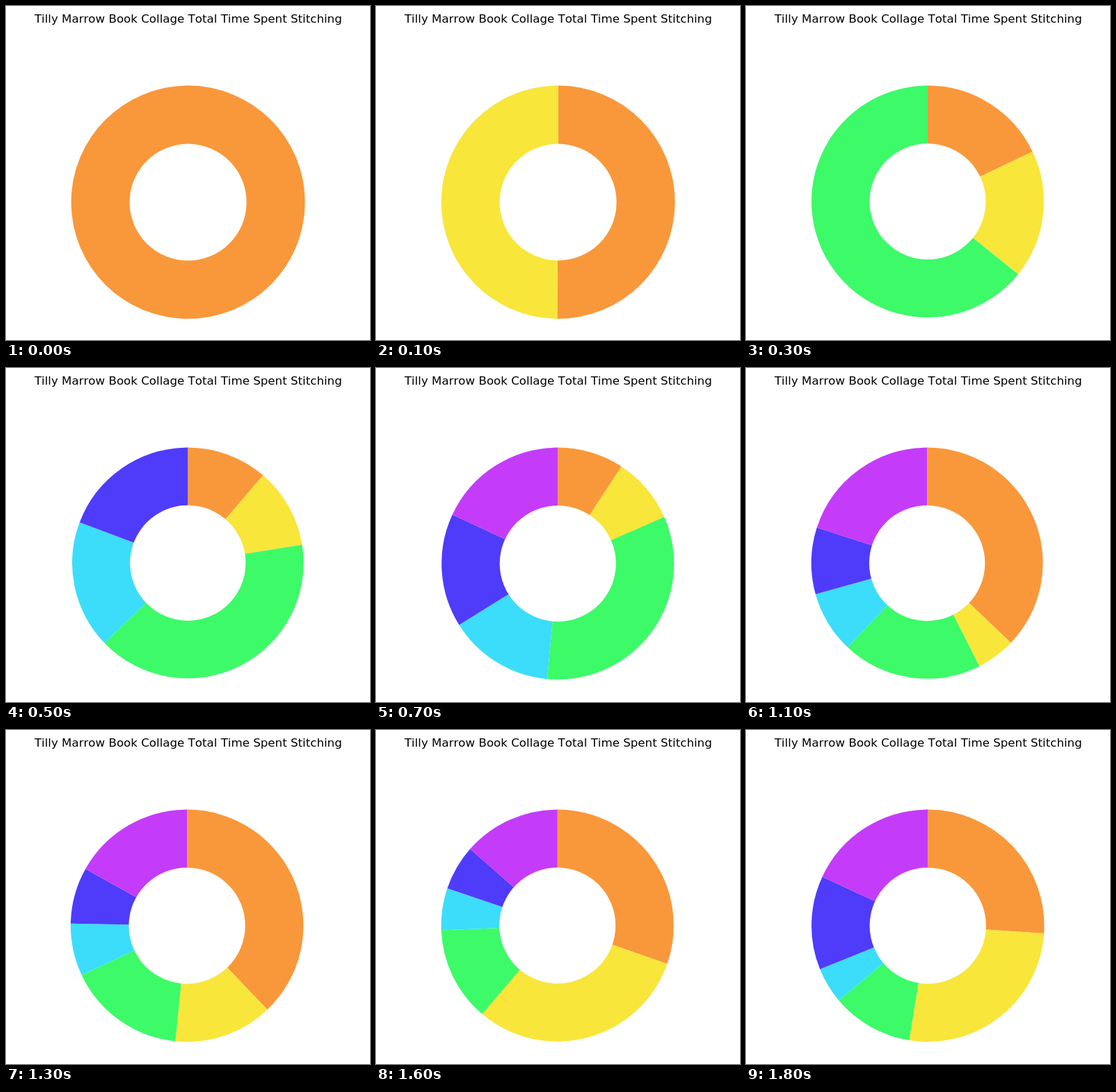
These frames come from a looping animation (523x481 px, 3.9 s). An HTML page:

```html
<!DOCTYPE html>
<html lang="en">
<head>
<meta charset="utf-8">
<title>Time Spent Stitching</title>
<style>
  html, body { margin: 0; width: 100%; height: 100%; overflow: hidden; background: #fff; }
  svg { display: block; }
  text { font: 16.667px "DejaVu Sans", sans-serif; font-kerning: none; text-anchor: middle; }
</style>
</head>
<body>
<svg width="523" height="481" viewBox="0 0 523 481">
  <text x="261.8" y="24">Tilly Marrow Book Collage Total Time Spent Stitching</text>
  <g id="wedges"></g>
  <circle id="hole" fill="#fff"/>
</svg>
<script>
const COLORS = ['#f9983a', '#f8e63b', '#3dfa69', '#3cddfa', '#4e3cfa', '#c43cfa'];
// One stitching session per step: [category, hours]
const SESSIONS = [
  [0, 1], [1, .995], [2, 1.79], [2, 1.79], [3, 1.59], [4, 1.71], [5, .98], [5, .98], [5, 1.72],
  [0, 2.94], [0, 1.44], [0, 1.44], [0, 1.44], [1, 2], [1, 1.8], [1, 1.8], [1, 1.8],
  [4, 2.42], [5, 2.05]
];
const STEP = 100, LOOP = 3900;
const MID_X = 261.6, TOP = 114.6, HEIGHT = 336;
const { sin, cos, tan, PI } = Math;

const wedges = document.getElementById('wedges');
const hole = document.getElementById('hole');
const paths = COLORS.map(color => {
  const path = document.createElementNS('http://www.w3.org/2000/svg', 'path');
  path.setAttribute('fill', color);
  return wedges.appendChild(path);
});

// Clockwise angles from the top, one [start, end] per category
function slices(step) {
  const hours = COLORS.map(() => 0);
  for (const [i, h] of SESSIONS.slice(0, step + 1)) hours[i] += h;
  const total = hours.reduce((a, b) => a + b);
  let end = 0;
  return hours.map(h => [end, end += h / total * 2 * PI]);
}

// The chart is scaled to the bounds of the Bezier handles of its arcs
function layout(arcs) {
  let left = -1, right = 1, bottom = 1;
  for (const [a, b] of arcs) {
    if (b <= a) continue;
    const n = 2 ** Math.ceil((b - a) / (PI / 2) - 1e-9);
    const d = (b - a) / n, k = 4 / 3 * tan(d / 4);
    for (let i = 0; i < n; i++) {
      for (const [t, s] of [[a + i * d, k], [a + (i + 1) * d, -k]]) {
        const x = sin(t) + s * cos(t), y = -cos(t) + s * sin(t);
        left = Math.min(left, x);
        right = Math.max(right, x);
        bottom = Math.max(bottom, y);
      }
    }
  }
  const r = HEIGHT / (1 + bottom);
  return { r, x: MID_X - r * (left + right) / 2, y: TOP + r };
}

function draw(step) {
  const arcs = slices(step);
  const { r, x, y } = layout(arcs);
  const point = t => `${x + r * sin(t)} ${y - r * cos(t)}`;
  const arcTo = t => `A${r} ${r} 0 0 1 ${point(t)}`;
  arcs.forEach(([a, b], i) => paths[i].setAttribute('d', b > a
    ? `M${x} ${y}L${point(a)}${arcTo((a + b) / 2)}${arcTo(b)}Z` : ''));
  hole.setAttribute('cx', x);
  hole.setAttribute('cy', y);
  hole.setAttribute('r', r / 2);
}

const start = performance.now();
function tick() {
  const t = (performance.now() - start) % LOOP;
  draw(Math.min(SESSIONS.length - 1, Math.floor(t / STEP)));
  requestAnimationFrame(tick);
}
tick();
</script>
</body>
</html>
```
